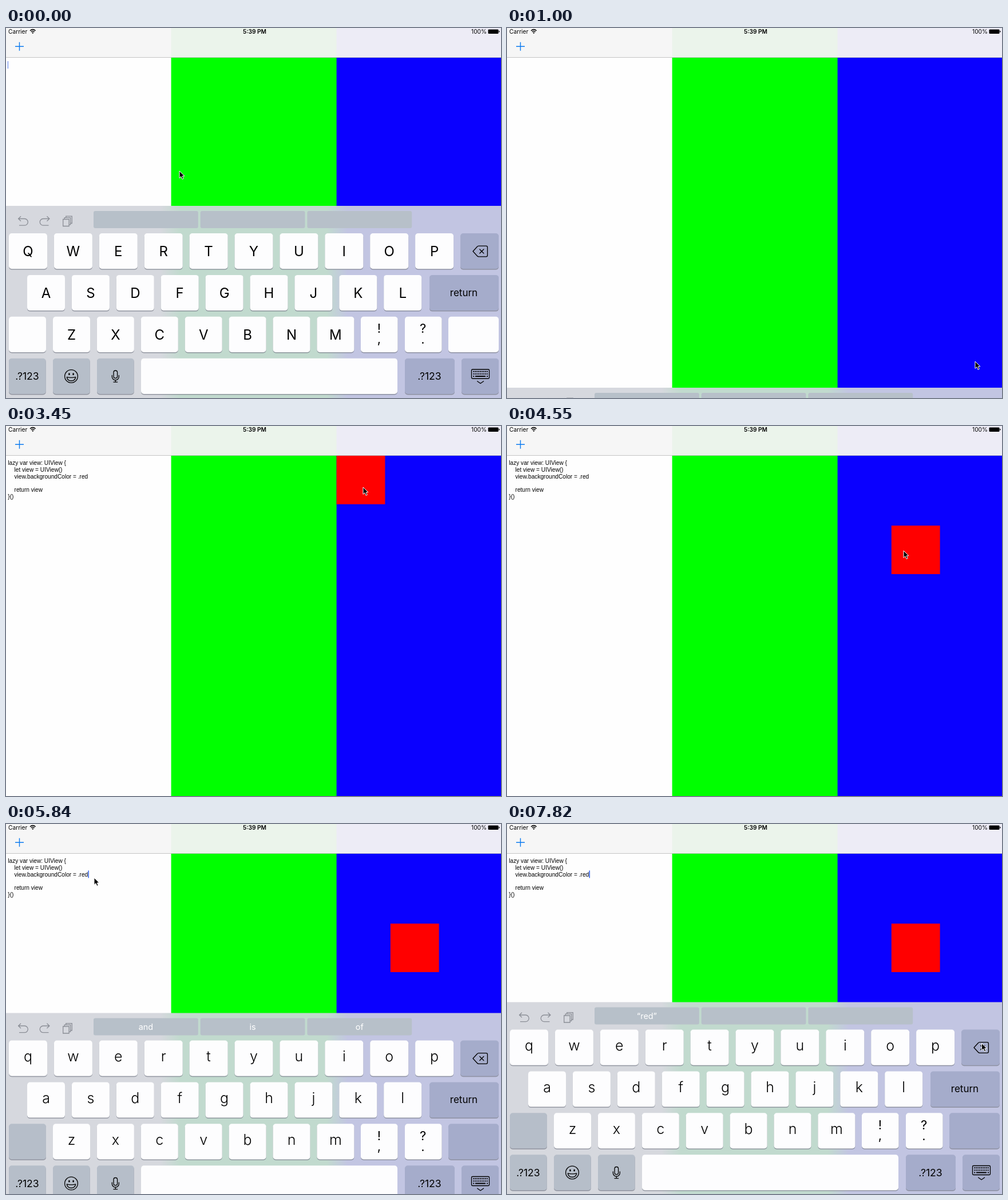
Write an HTML page that moves like this. It is 865 by 647 pixels and loops after 8 s.

```html
<!DOCTYPE html>
<html lang="en">
<head>
<meta charset="utf-8">
<title>View editor demo</title>
<style>
  html, body { margin: 0; width: 100%; height: 100%; overflow: hidden; background: #fff; }
  svg { display: block; width: 865px; height: 647px; }
  text { font-family: Inter, Roboto, sans-serif; white-space: pre; }
  .status text { font-size: 10.2px; }
  .code { font: 10.15px "Liberation Sans", Arial, sans-serif; }
  .keys text { text-anchor: middle; font-size: 24px; }
  .keys #lower text { font-size: 25px; font-weight: 300; }
  .keys .word { font-size: 17px; }
  .keys .num { font-size: 17.6px; }
  .keys .mark { font-size: 22px; }
  .keys .hint { font-size: 14.4px; fill: #fff; }
  .line { fill: none; stroke: #000; stroke-width: 1.3; stroke-linejoin: round; stroke-linecap: round; }
  .tool { fill: none; stroke: #8b8e96; stroke-width: 1.3; }
</style>
</head>
<body>
<svg viewBox="0 0 865 647">
  <defs>
    <linearGradient id="blur" gradientUnits="userSpaceOnUse" x1="0" y1="0" x2="865" y2="0">
      <stop offset=".312" stop-color="#d6d8de"/>
      <stop offset=".352" stop-color="#c1dace"/>
      <stop offset=".648" stop-color="#c1dace"/>
      <stop offset=".69" stop-color="#c2c5e2"/>
    </linearGradient>
  </defs>

  <rect y="51" width="865" height="596" fill="#fefefe"/>
  <rect x="288.6" y="51" width="577" height="596" fill="#0f0"/>
  <rect x="577.6" y="51" width="288" height="596" fill="#0a00ff"/>
  <g id="code"></g>
  <rect id="caret" width="1.6" height="13" fill="#3465ee"/>
  <rect id="box" width="84.8" height="84.8" fill="#f00"/>

  <rect width="865" height="52" fill="#f6f6f6"/>
  <rect x="288.6" width="577" height="52" fill="#ebf4eb"/>
  <rect x="577.6" width="288" height="52" fill="#edecf6"/>
  <rect y="51" width="865" height="1" opacity=".2"/>
  <g class="status">
    <text x="4" y="10">Carrier</text>
    <text x="434.5" y="10" text-anchor="middle" font-weight="600">5:39 PM</text>
    <text x="840" y="10" text-anchor="end">100%</text>
    <path d="M42 4.8q4.8-4.4 9.6 0M43.8 6.8q3-2.7 6 0" fill="none" stroke="#000" stroke-width="1.5"/>
    <path d="M45.2 8.3q1.6-1.4 3.2 0l-1.6 1.8z"/>
    <rect x="842.5" y="2.4" width="18" height="7.6" rx="1.3"/>
    <path d="M861.2 4.6q1.4.4 1.4 1.6t-1.4 1.6z"/>
  </g>
  <path id="plus" d="M16 32.2h15M23.5 24.7v15" stroke="#0a7aef" stroke-width="1.4"/>

  <g id="board" class="keys"></g>

  <path id="pointer" d="M0 0V12.4L2.9 9.7L5 14.4L7.2 13.4L5.2 8.9H9z" fill="#000"
        stroke="#fff" stroke-width="1" stroke-linejoin="round"/>
</svg>

<script>
const $ = id => document.getElementById(id);
const LOOP = 8000, HOME = 311, HEIGHT = 336;
const WHITE = '#fdfdfe', COOL = '#b6bec9', VIOLET = '#a5accb';

// ---- drawing ----
const rowY = row => HOME + 48 + 72.9 * row;
const tint = x => x < 433 ? COOL : VIOLET;
const key = (x, row, w, fill = WHITE, id = '') =>
  `<rect x="${x}" y="${rowY(row) + 1.2}" width="${w}" height="62.5" rx="5" fill="#7d818c" opacity=".75"/>
   <rect id="${id}" x="${x}" y="${rowY(row)}" width="${w}" height="62.2" rx="5" fill="${fill}"/>`;
const darkKey = (x, row, w, id) => key(x, row, w, tint(x), id);
const label = (x, y, s, cls = '') => `<text class="${cls}" x="${x}" y="${y}">${s}</text>`;
const arrow = x => `<path d="M${x} 527l10.3 10.2h-5v8h-10.6v-8h-5z"/>`;

function letterKeys() {
  let caps = '', upper = '', lower = '';
  ['QWERTYUIOP', 'ASDFGHJKL', 'ZXCVBNM'].forEach((letters, row) => {
    const left = [5, 37, 82][row], step = 78.9 - row, w = 67 - row;
    [...letters].forEach((c, i) => {
      const x = left + step * i, mid = x + w / 2;
      caps += key(x, row, w);
      upper += label(mid, rowY(row) + 39.7, c);
      lower += label(mid, rowY(row) + 36.7, c.toLowerCase());
    });
  });
  return caps +
    `<g id="upper">${upper}${arrow(38)}${arrow(817)}</g>
     <g id="lower">${lower}<g class="line">${arrow(38)}${arrow(817)}</g></g>`;
}

function otherKeys() {
  return darkKey(794, 0, 67) + darkKey(740, 1, 121) +
    darkKey(5, 2, 65, 'shiftL') + darkKey(773, 2, 88, 'shiftR') +
    key(620, 2, 64.5) + key(697, 2, 64.5) +
    [5, 82, 159].map(x => darkKey(x, 3, 64.7)).join('') +
    key(236, 3, 448) + darkKey(697, 3, 87) + darkKey(796, 3, 65, 'hide') +
    label(800, 468.7, 'return', 'word') +
    label(37, 615, '.?123', 'num') + label(740, 615, '.?123', 'num') +
    label(652, 533, '!', 'mark') + label(652, 551, ',', 'mark') +
    label(728.5, 533, '?', 'mark') + label(728.5, 552, '.', 'mark');
}

function toolbar() {
  const hints = [0, 1, 2].map(i => {
    const x = 153 + 186.7 * i;
    return `<rect x="${x}" y="320" width="182.8" height="30" rx="3" fill="#b7c0c9"/>
      <text id="hint${i}" class="hint" x="${x + 91.4}" y="340.3"></text>`;
  }).join('');
  const undo = '<path d="M22 333.5H32.5a5.7 5.7 0 0 1 0 11.6H23M26 329.3l-4.4 4.2l4.4 4.2"/>';
  return hints + `<g class="tool">${undo}
    <g transform="translate(97.5) scale(-1 1)">${undo}</g>
    <path d="M99.7 334.5h10.4v12h-10.4zM102.2 334v-2.4h10.4v12.2h-2.3M104.8 331.4v-2.3h10.4v12.4h-2.4"/>
  </g>`;
}

function icons() {
  let dots = '';
  for (let i = 0; i < 18; i++)
    dots += `M${816.3 + i % 9 * 2.95} ${600.8 + (i > 8) * 4.1}h1.9`;
  return `<g class="line">
    <path d="M816 390.5l7.3-8q1.2-1.3 2.7-1.3h13q2.4 0 2.4 2.4v13.8q0 2.4-2.4 2.4h-13q-1.5 0-2.7-1.3z
             M827.8 387l7 7M834.8 387l-7 7"/>
    <circle cx="114" cy="609" r="11.4"/>
    <path d="M106.3 610.3q7.7 2 15.4 0q-1 6.7-7.7 6.7t-7.7-6.7z"/>
    <rect x="188" y="599" width="6.6" height="13.4" rx="3.3"/>
    <path d="M185.3 607.5v2.2a6 6 0 0 0 12 0v-2.2M191.3 615.8v3.4M188 619.2h6.6"/>
    <rect x="813.5" y="597" width="31" height="16" rx="1.8"/>
    <path d="M823.7 617.7l5.4 3.8l5.4-3.8"/>
    <path d="${dots}M816.3 609h1.9M820 609h18M840 609h1.9" stroke-width="1.9" stroke-linecap="butt"/>
  </g>
  <ellipse cx="110.4" cy="605.2" rx="1.3" ry="1.9"/><ellipse cx="117.6" cy="605.2" rx="1.3" ry="1.9"/>`;
}

$('board').innerHTML = `<rect y="${HOME}" width="865" height="360" fill="url(#blur)"/>` +
  toolbar() + letterKeys() + otherKeys() + icons();

$('code').innerHTML = ['lazy var view: UIView {', '    let view = UIView()',
  '    view.backgroundColor = .red', '', '    return view', '}()']
  .map((s, i) => `<text class="code" x="3.3" y="${68.3 + 11.72 * i}">${s}</text>`).join('');

// ---- motion ----
const CLOSE = 1000, ADD = 2840, GRAB = 3660, DROP = 4460, EDIT = 5840;
const clamp = (v, lo = 0, hi = 1) => Math.min(hi, Math.max(lo, v));
const easeOut = k => 1 - (1 - k) ** 3;
const easeInOut = k => k * k * (3 - 2 * k);

// Pointer strokes, in order
const strokes = [
  { from: 80, to: 620, x: 818, y: 583, ease: easeOut },
  { from: 1160, to: 2220, x: 28, y: 47 },
  { from: 2220, to: 2450, x: 23, y: 33 },
  { from: 2860, to: 3230, x: 681, y: 116 },
  { from: 3230, to: 3450, x: 624, y: 107 },
  { from: GRAB, to: DROP, x: 722, y: 241 },
  { from: DROP, to: 4550, x: 693, y: 218 },
  { from: 4550, to: 5200, x: 147, y: 83 },
  { from: 5420, to: 5670, x: 154, y: 94 },
  { from: 7090, to: 7820, x: 829.5, y: 383.5 }
];

function pointerAt(t) {
  let x = 303, y = 250;
  for (const s of strokes) {
    const k = (s.ease || easeInOut)(clamp((t - s.from) / (s.to - s.from)));
    x += (s.x - x) * k;
    y += (s.y - y) * k;
  }
  return [x, y];
}

// The square hangs from the pointer while dragged, and stays inside its column.
function squareAt(t) {
  const [x, y] = pointerAt(clamp(t, GRAB, DROP));
  return [Math.max(577.6, x - 50.2), Math.max(52, y - 66.8)];
}

// The keyboard is first seen late in its slide, then settles.
function boardDrop(t) {
  const left = age => HEIGHT * Math.exp(-(age + 200) / 70);
  if (t < CLOSE) return 0;
  return t < EDIT ? (HEIGHT + 4) - left(t - CLOSE) - 3 : left(t - EDIT) + .5;
}

const blink = t => clamp(.5 + 4.5 * Math.cos(2 * Math.PI * (t - 675) / 896));

const move = (id, x, y) => $(id).setAttribute('transform', `translate(${x} ${y})`);
const fade = (id, v) => $(id).setAttribute('opacity', +v);
const fill = (id, c) => $(id).setAttribute('fill', c);

function render(t) {
  const late = t >= EDIT, typing = t < CLOSE || late;
  move('pointer', ...pointerAt(t));
  move('box', ...squareAt(t));
  move('board', 0, boardDrop(t));
  move('caret', late ? 143.4 : 2.6, late ? 81.4 : 58);
  fade('caret', typing ? blink(t) : 0);
  fade('plus', t > 2420 && t < ADD + 60 ? .3 : 1);
  fade('box', t >= ADD);
  fade('code', t >= ADD);
  fade('board', typing || t < CLOSE + 240);
  fade('upper', !late);
  fade('lower', late);
  fill('shiftL', late ? COOL : WHITE);
  fill('shiftR', late ? VIOLET : WHITE);
  fill('hide', t >= 760 && !late ? WHITE : VIOLET);
  const words = !late ? [] : t < EDIT + 300 ? ['and', 'is', 'of'] : ['“red”'];
  for (let i = 0; i < 3; i++) $('hint' + i).textContent = words[i] || '';
}

const start = performance.now();
function tick() {
  render((performance.now() - start) % LOOP);
  requestAnimationFrame(tick);
}
tick();
</script>
</body>
</html>
```
